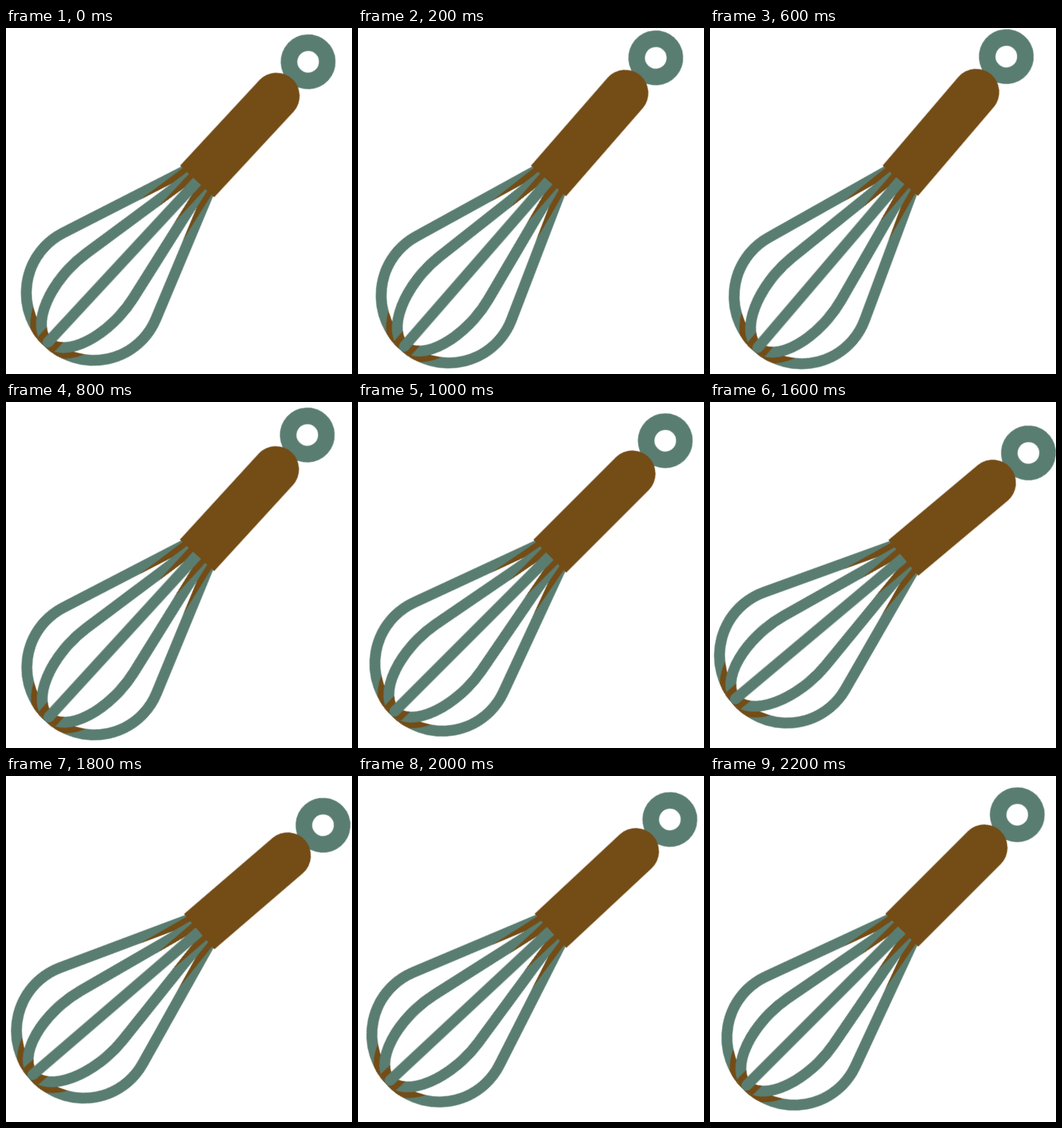
An HTML page that plays this animation: 480 by 480 pixels, repeating every 2400 ms.

```html
<!DOCTYPE html>
<html lang="en">
<head>
<meta charset="utf-8">
<title>Whisk</title>
<style>
  html, body { margin: 0; width: 100%; height: 100%; overflow: hidden; background: #fff; }
  svg { display: block; width: 100vw; height: 100vh; }
  .whisk { --metal: #5a7d71; --wood: #744c16; shape-rendering: geometricPrecision; animation: rock 2400ms step-end infinite; }
  .wire { fill: none; stroke: var(--metal); stroke-width: 15; }
  .shade { fill: none; stroke: var(--wood); stroke-width: 31; }
  .cut { fill: none; stroke: #fff; stroke-width: 15; }
  .ring { fill: none; stroke: var(--metal); stroke-width: 23; }
  .handle { fill: var(--wood); }

  /* twelve held poses, 200 ms each */
  @keyframes rock {
    0%       { transform: rotate(42.85deg); }
    8.3333%  { transform: rotate(41.08deg); }
    16.6667% { transform: rotate(40deg); }
    25%      { transform: rotate(40.5deg); }
    33.3333% { transform: rotate(42.5deg); }
    41.6667% { transform: rotate(45deg); }
    50%      { transform: rotate(47deg); }
    58.3333% { transform: rotate(48.92deg); }
    66.6667% { transform: rotate(50deg); }
    75%      { transform: rotate(49.33deg); }
    83.3333% { transform: rotate(47deg); }
    91.6667%, 100% { transform: rotate(45deg); }
  }
</style>
</head>
<body>
<svg viewBox="-240 -240 480 480">
  <defs>
    <path id="outer" d="M0-98L-87.8 141.9A93.5 93.5 0 1 0 87.8 141.9Z"/>
    <path id="inner" d="M0-98L-45.1 141.9A48 93.5 0 1 0 45.1 141.9Z"/>
    <path id="middle" d="M0-98V267.5" stroke-linecap="round"/>
    <mask id="onOuter" maskUnits="userSpaceOnUse" x="-120" y="-120" width="240" height="420">
      <use href="#outer" class="cut"/>
    </mask>
    <mask id="onInner" maskUnits="userSpaceOnUse" x="-120" y="-120" width="240" height="420">
      <use href="#inner" class="cut"/>
    </mask>
  </defs>
  <g class="whisk">
    <!-- each wire shades only the wire beneath it -->
    <use href="#outer" class="wire"/>
    <g mask="url(#onOuter)"><use href="#inner" class="shade"/></g>
    <use href="#inner" class="wire"/>
    <g mask="url(#onInner)"><use href="#middle" class="shade"/></g>
    <use href="#middle" class="wire"/>
    <circle class="ring" cy="-263.4" r="26.5"/>
    <path class="handle" d="M-32.3-37V-198.7A32.3 32.3 0 0 1 32.3-198.7V-37Z"/>
  </g>
</svg>
</body>
</html>
```
